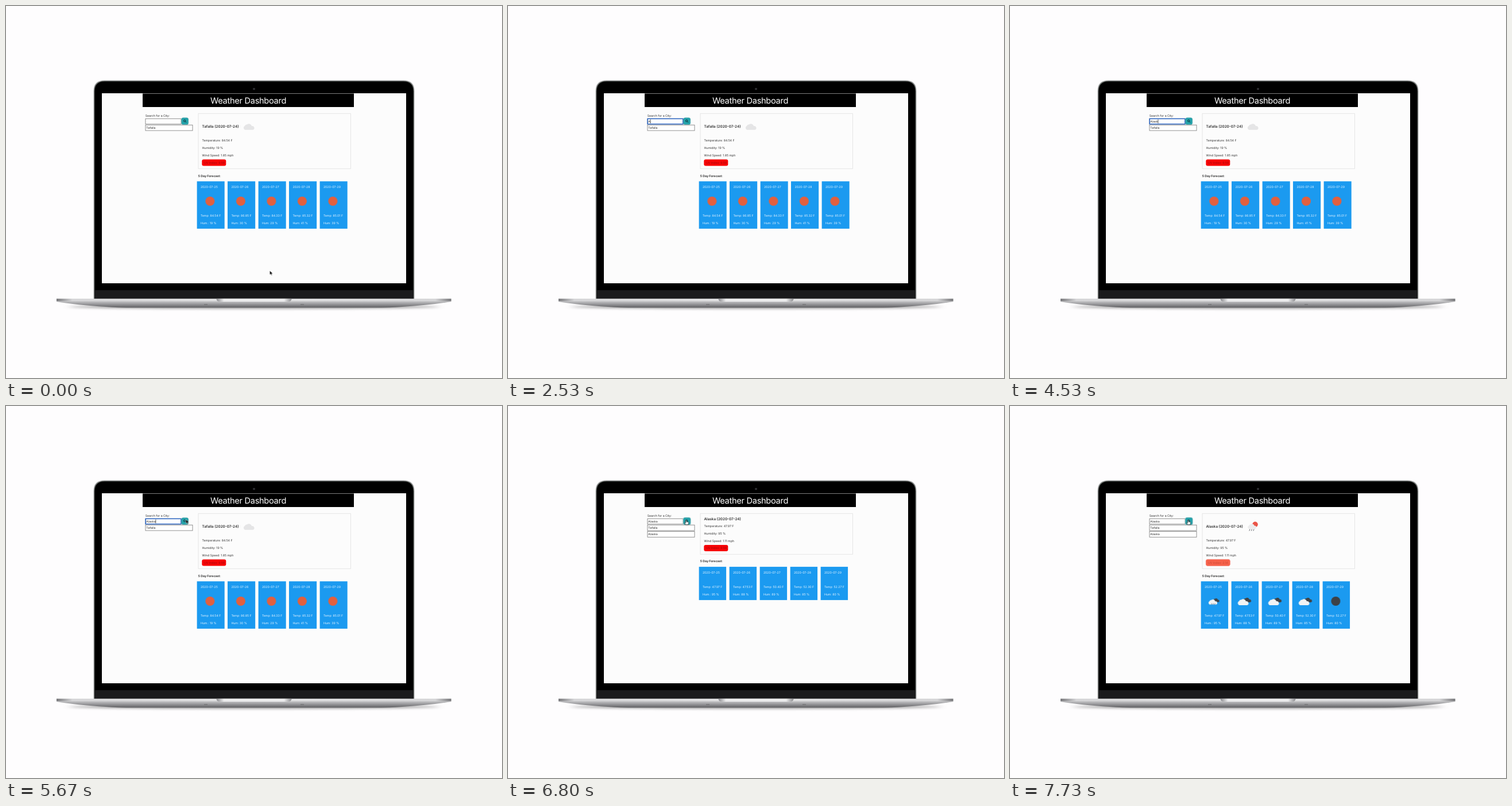
An HTML page that plays this animation: 864x648 px, repeating every 8 s.

```html
<!DOCTYPE html>
<html lang="en">
<head>
<meta charset="utf-8">
<title>Weather Dashboard</title>
<style>
  html, body { margin: 0; width: 100%; height: 100%; overflow: hidden; background: #fefdfe; }
  svg { display: block; width: 864px; height: 648px; }
  text { font: 5.2px Inter, sans-serif; fill: #303030; text-rendering: geometricPrecision; white-space: pre; }
  .title { font-size: 14.6px; letter-spacing: -.3px; fill: #fff; text-anchor: middle; }
  .city { font-size: 6.3px; font-weight: 600; }
  .bold { font-weight: 700; }
  .field { fill: #fff; stroke: #858585; stroke-width: .9; }
  .card rect { fill: #1b9af0; }
  .card text { fill: #e9f5ff; }

  .old, .new, .icon, .saved, .focus, .pressed, .arrow, .beam, .hand, .lift, .box, .card rect, .cursor {
    animation: 8s step-end infinite;
  }
  .old { animation-name: old; }
  .new { animation-name: new; }
  .icon { animation-name: icon; }
  .saved { animation-name: saved; }
  .focus { animation-name: focus; }
  .pressed { animation-name: saved; }
  .arrow { animation-name: arrow; }
  .beam { animation-name: beam; }
  .hand { animation-name: hand; }
  .lift { animation-name: lift; }
  .box { animation-name: box; }
  .card rect { animation-name: shrink; }
  .cursor { animation-name: move; animation-timing-function: ease-in-out; }

  @keyframes old { 0% { visibility: visible } 81.625%, 100% { visibility: hidden } }
  @keyframes new { 0% { visibility: hidden } 81.625%, 100% { visibility: visible } }
  @keyframes icon { 0% { visibility: hidden } 88.375%, 100% { visibility: visible } }
  @keyframes saved { 0% { visibility: hidden } 79.125%, 100% { visibility: visible } }
  @keyframes focus { 0% { visibility: hidden } 13% { visibility: visible } 79.125%, 100% { visibility: hidden } }
  @keyframes arrow {
    0% { visibility: visible } 9% { visibility: hidden }
    65% { visibility: visible } 76%, 100% { visibility: hidden }
  }
  @keyframes beam {
    0% { visibility: hidden } 9% { visibility: visible } 26.625% { visibility: hidden }
    62.5% { visibility: visible } 65%, 100% { visibility: hidden }
  }
  @keyframes hand { 0% { visibility: hidden } 76%, 100% { visibility: visible } }
  /* the page is shorter until the weather icons have loaded */
  @keyframes lift {
    0% { transform: none } 81.625% { transform: translateY(var(--up)) } 88.375%, 100% { transform: none }
  }
  @keyframes box { 0% { height: 96px } 81.625% { height: 71px } 88.375%, 100% { height: 96px } }
  @keyframes shrink { 0% { height: 82.5px } 81.625% { height: 58px } 88.375%, 100% { height: 82.5px } }
  @keyframes move {
    0%, .9% { transform: translate(459.5px, 461px) }
    9.5%, 11% { transform: translate(262px, 194px) }
    15.5%, 62% { transform: translate(271.5px, 200.8px) }
    67.5%, 75% { transform: translate(313.5px, 197.5px) }
    78%, 100% { transform: translate(310.3px, 198.3px) }
  }
</style>
</head>
<body>
<svg viewBox="0 0 864 648">
  <defs>
    <linearGradient id="deck" x2="0" y2="1">
      <stop offset="0" stop-color="#d9d9da"/><stop offset=".28" stop-color="#c4c4c6"/>
      <stop offset=".6" stop-color="#98989b"/><stop offset="1" stop-color="#5f5f62"/>
    </linearGradient>
    <linearGradient id="lip">
      <stop offset="0" stop-color="#77777a"/><stop offset=".04" stop-color="#d5d5d7"/>
      <stop offset=".5" stop-color="#e3e3e4"/><stop offset=".96" stop-color="#d5d5d7"/>
      <stop offset="1" stop-color="#77777a"/>
    </linearGradient>
    <linearGradient id="notch">
      <stop offset="0" stop-color="#8b8b8e"/><stop offset=".1" stop-color="#ececed"/>
      <stop offset=".9" stop-color="#ececed"/><stop offset="1" stop-color="#8b8b8e"/>
    </linearGradient>
    <filter id="soft" x="-10%" y="-200%" width="120%" height="500%"><feGaussianBlur stdDeviation="7 2"/></filter>
    <path id="cloud" d="M-7 5.5a4 4 0 0 1 .3-7.2 3 3 0 0 1 3.4-2 5 5 0 0 1 8.4 2.6 3.4 3.4 0 0 1 1.9 6.6z"/>
    <g id="cloudy">
      <use href="#cloud" fill="#3f4348" transform="translate(5 -2.2) scale(.75)"/>
      <use href="#cloud" fill="#f1f3f4" transform="translate(-2 1.4)"/>
    </g>
    <path id="rain" d="M-4 4.5l-1.2 3M-.5 4.5l-1.2 3M3 4.5l-1.2 3" stroke="#50545a" stroke-width=".9"/>
  </defs>

  <rect width="864" height="648" fill="#fefdfe"/>

  <!-- laptop -->
  <ellipse cx="432" cy="524" rx="322" ry="3.5" fill="#555" opacity=".55" filter="url(#soft)"/>
  <path d="M152.5 510V148q0-18.5 18.5-18.5H693q18.5 0 18.5 18.5V510z" fill="#a9aaab"/>
  <path d="M153.6 510V148.5q0-18 18-18H692.4q18 0 18 18V510z" fill="#4d524e"/>
  <path d="M154.4 510V149q0-17.6 17.6-17.6H692q17.6 0 17.6 17.6V510z" fill="#000"/>
  <rect x="155" y="495" width="554" height="15" fill="#1b1b1d"/>
  <circle cx="432" cy="144.5" r="2.1" fill="#28282b"/>
  <circle cx="432" cy="144.5" r=".8" fill="#45454c"/>
  <path d="M88 510H775.5V515Q741 521 690 524 670 525.5 640 525.5H224Q194 525.5 174 524 123 521 88 515z" fill="url(#deck)"/>
  <rect x="88" y="509.8" width="687.5" height="4.4" fill="url(#lip)"/>
  <path d="M366.500 509.800H497.500Q497.500 515 491 515H373Q366.500 515 366.500 509.800z" fill="url(#notch)"/>
  <path d="M345 520h6M513 520h6" stroke="#68686b"/>

  <!-- page -->
  <rect x="167" y="152" width="530" height="331" fill="#fcfcfc"/>
  <rect x="238" y="152.500" width="368" height="23.500" fill="#000"/>
  <text class="title" x="422" y="170">Weather Dashboard</text>

  <text x="242.700" y="192.800">Search for a City:</text>
  <rect class="field" x="243" y="196.300" width="62" height="9.400"/>
  <rect class="focus" x="243.200" y="196.400" width="61.600" height="9.200" fill="#fff" stroke="#2c66c4" stroke-width="1.500"/>
  <text id="query" x="244.300" y="202.900"></text>
  <path id="caret" d="M0 197.600v6.800" stroke="#111" stroke-width=".7"/>

  <rect class="pressed" x="304.800" y="193.800" width="13.900" height="13.700" rx="3.500" fill="#9fd3d6"/>
  <rect x="305.700" y="194.700" width="12" height="11.900" rx="2.800" fill="#22a2aa" stroke="#4c9fa5" stroke-width=".6"/>
  <g fill="none" stroke="#11343b" stroke-width="1">
    <circle cx="311.200" cy="200" r="1.700"/><path d="M312.500 201.300l1.700 1.700"/>
  </g>

  <rect class="field" x="243" y="207.300" width="82" height="9.700"/>
  <text x="244.300" y="214">Tafalla</text>
  <g class="saved">
    <rect class="field" x="243" y="218.500" width="82" height="9.900"/>
    <text x="244.300" y="225.300">Alaska</text>
  </g>

  <rect class="box" x="335" y="187.300" width="265.500" height="96" fill="none" stroke="#e3e3e3" stroke-width=".9"/>
  <g class="old">
    <text class="city" x="341.500" y="211.800">Tafalla (2020-07-24)</text>
    <use href="#cloud" fill="#e5e5e6" transform="translate(423 210.300)"/>
    <text x="341.500" y="236">Temperature: 84.54 F</text>
    <text x="341.500" y="248.800">Humidity: 19 %</text>
    <text x="341.500" y="261.800">Wind Speed: 1.85 mph</text>
  </g>
  <g class="new">
    <text class="city lift" style="--up:-12.300px" x="341.500" y="211.800">Alaska (2020-07-24)</text>
    <g class="icon" transform="translate(423 209)">
      <circle cx="4" cy="-2.700" r="4.800" fill="#ea5548"/>
      <use href="#cloud" fill="#ececed" transform="translate(-1.500 .5) scale(.8)"/>
      <use href="#rain" x="-1" y="1"/>
    </g>
    <g class="lift" style="--up:-25.200px">
      <text x="341.500" y="236">Temperature: 47.97 F</text>
      <text x="341.500" y="248.800">Humidity: 95 %</text>
      <text x="341.500" y="261.800">Wind Speed: 1.11 mph</text>
    </g>
  </g>
  <g class="lift" style="--up:-25.300px">
    <rect x="341.300" y="267.200" width="42" height="11.200" rx="3" fill="#f70406"/>
    <text x="345" y="274.700" style="fill:#a00a0a">UV Index: 9.56</text>
    <g class="icon">
      <rect x="341.300" y="267.200" width="42" height="11.200" rx="3" fill="#f6614a" stroke="#f5a093" stroke-width=".7"/>
      <text x="345" y="274.700" style="fill:#c94a38">UV Index: 2.14</text>
    </g>
    <text class="bold" x="334.800" y="297.600">5 Day Forecast:</text>
  </g>
  <g id="cards"></g>

  <!-- pointer -->
  <g class="cursor">
    <path class="arrow" d="M0 0v7.200l1.600-1.500 1.200 2.600 1.200-.5-1.200-2.500h2.300z" fill="#000" stroke="#fff" stroke-width=".5"/>
    <path class="beam" d="M-1.500-4.300Q0-4.300 0-3.300 0-4.300 1.500-4.300M0-3.300V3.300M-1.500 4.300Q0 4.300 0 3.300 0 4.300 1.500 4.300" fill="none" stroke="#111" stroke-width=".8"/>
    <path class="hand" d="M-.8.8Q0-.6.8.8V3.200L3.600 3.800Q4.600 4.200 4.300 5.500L3.500 8.500H-.6L-3 5.300Q-2.700 4.100-.8 5.400z" fill="#fff" stroke="#111" stroke-width=".7"/>
  </g>
</svg>
<script>
  const first = { cls: 'old', step: 53.5, width: 48.3,
    temps: ['84.54', '86.85', '84.33', '85.32', '85.01'], hums: [19, 30, 29, 41, 39] };
  const second = { cls: 'new', step: 53, width: 47.8,
    temps: ['47.97', '47.53', '50.40', '52.30', '52.27'], hums: [95, 88, 89, 85, 80] };

  function sky(cls, i) {
    if (cls === 'old') return '<circle cx="23" cy="340" r="8" fill="#e1603f"/>';
    if (i === 4) return '<circle class="icon" cx="23" cy="340" r="8" fill="#3d4146"/>';
    const rain = i ? '' : '<use href="#rain"/>';
    return `<g class="icon" transform="translate(22.500 340) scale(${i ? 1 : .82})"><use href="#cloudy"/>${rain}</g>`;
  }

  function forecast({ cls, step, width, temps, hums }) {
    return temps.map((temp, i) => `
      <g class="card ${cls}" transform="translate(${332.4 + i * step} 0)">
        <g class="lift" style="--up:-25.300px">
          <rect y="305.400" width="${width}" height="82.500"/>
          <text x="6.500" y="317.300">2020-07-${25 + i}</text>
        </g>
        ${sky(cls, i)}
        <g class="lift" style="--up:-49.500px">
          <text x="6.500" y="366.500">Temp: ${temp} F</text>
          <text x="6.500" y="379.500">Hum${i ? '' : '.'}: ${hums[i]} %</text>
        </g>
      </g>`).join('');
  }

  document.getElementById('cards').innerHTML = forecast(first) + forecast(second);

  const query = document.getElementById('query');
  const caret = document.getElementById('caret');
  const keyTimes = [2130, 2730, 3270, 3930, 4330, 4800];

  function draw() {
    const t = performance.now() % 8000;
    query.textContent = 'Alaska'.slice(0, keyTimes.filter(k => t >= k).length);
    const focused = t >= 1040 && t < 6330;
    const blink = t >= 1800 && t < 2130;
    caret.style.visibility = focused && !blink ? 'visible' : 'hidden';
    caret.setAttribute('transform', `translate(${244.6 + query.getComputedTextLength()} 0)`);
    requestAnimationFrame(draw);
  }
  draw();
</script>
</body>
</html>
```
